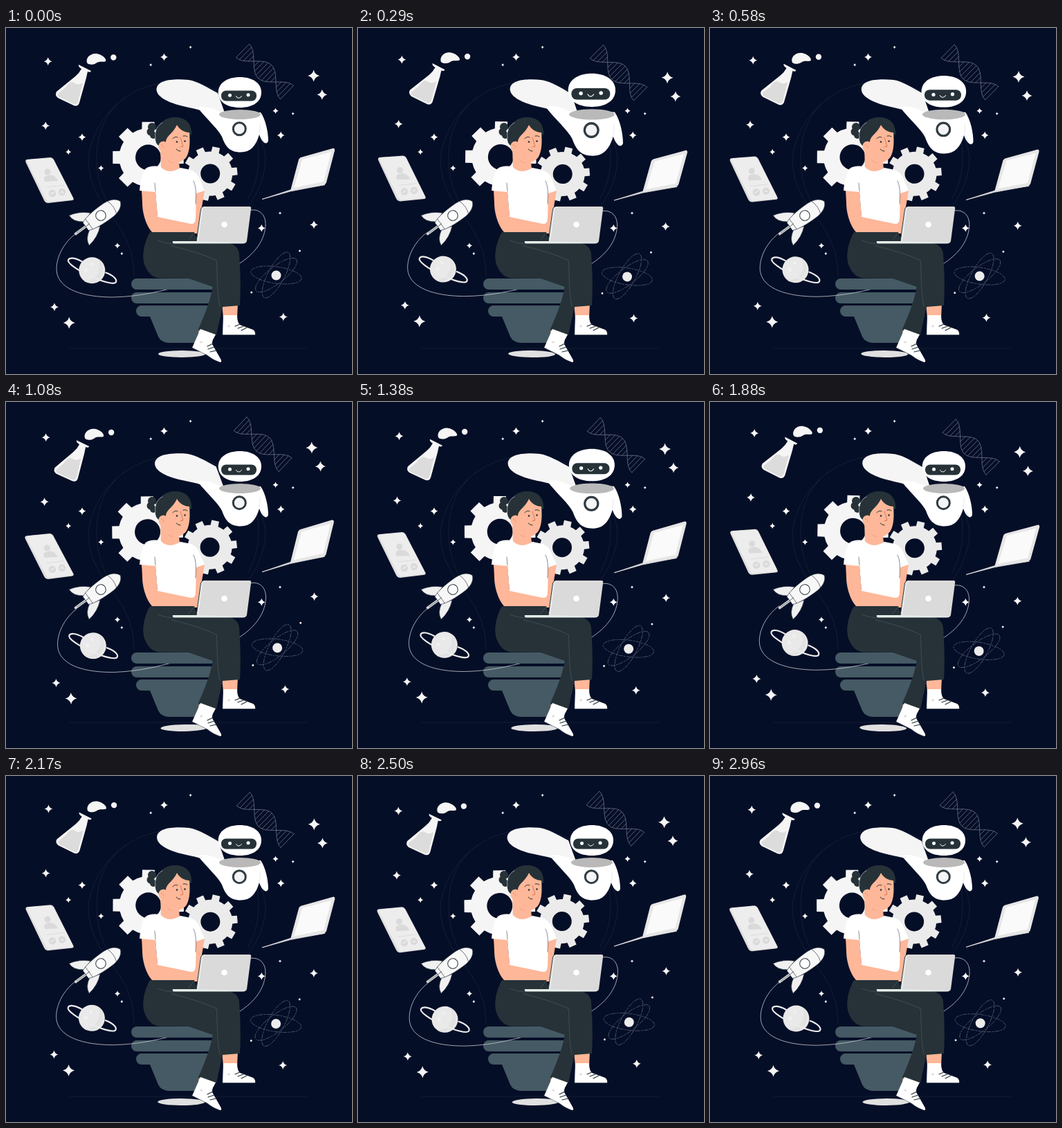
Write an HTML page that moves like this. It is 500x500 px and loops after 3000 ms.

```html
<!DOCTYPE html>
<html lang="en">
<head>
<meta charset="utf-8">
<title>Ideas in orbit</title>
<style>
  html, body { margin: 0; width: 100%; height: 100%; overflow: hidden; background: #050e27; }
  svg { display: block; width: 100vw; height: 100vh; }
</style>
</head>
<body>
<svg viewBox="0 0 500 500" fill="none" stroke-linecap="round" stroke-linejoin="round">
  <g id="bulbOutline" stroke="#18223b" stroke-width=".8">
    <path d="M185 357C184 315 169 294 149 267C130 243 119 218 119 187A129 125 0 0 1 375 187C375 222 358 250 335 278"/>
    <path d="M144 247C135 229 131 208 131 187C131 153 143 126 163 108M167 104L172 100M352 130C361 147 365 166 365 187C365 210 359 231 349 248"/>
    <path d="M92 463H435"/>
  </g>

  <g id="bulbBase" fill="#455a64">
    <path d="M189 382H300V398H189A8 8 0 0 1 189 382Z"/>
    <path d="M196 401H298L280 455H234Q224 454 220 446L208 417H196A8 8 0 0 1 196 401Z"/>
  </g>

  <g id="wind">
    <g id="movingStars" fill="#f5f5f5"></g>
    <path d="M101 297C78 314 70 341 74 356C80 378 111 389 155 389C196 388 224 380 260 371C305 360 371 336 375 286C376 266 362 260 350 264" stroke="#c9ccd3" stroke-width=".8"/>
    <ellipse cx="254" cy="471" rx="34" ry="5" fill="#e0e0e0"/>
    <path id="bigGear" fill="#f5f5f5" fill-rule="evenodd"/>
    <path id="smallGear" fill="#ebebeb" fill-rule="evenodd"/>
    <path d="M217.500 88C219 75 241 73 264 75C277 77 291 86 306 94L318 128L296 126C285 118 272 117 252 112C233 107 217 99 217.500 88Z" fill="#f5f5f5"/>

    <g id="flask">
      <path d="M105 53Q104 56 109 59Q106 65 100 70L73 92Q70 97 75 101L98 112Q104 114 106 108L116 72Q117 67 118 63Q122 65 123 62Z" fill="#f5f5f5"/>
      <path d="M86 86L75 95Q74 98 77 100L98 110Q102 111 104 107L111 79Q104 84 98 79Q92 76 86 86Z" fill="#dcdcdc"/>
      <path d="M117 50C115 43 122 36 131 37C139 38 146 45 144 48C140 50 135 47 130 51C125 54 118 53 117 50Z" fill="#f5f5f5"/>
      <circle cx="155.3" cy="42.5" r="4.2" fill="#f5f5f5"/>
    </g>

    <g id="dna" stroke="#6b7386" stroke-width=".8"></g>

    <g id="phone">
      <path d="M30 190L64 187Q67 187 69 190L97 245Q99 248 96 249L61 253Q57 253 55 249L29 195Q27 191 30 190Z" fill="#dedede"/>
      <path d="M33 190L64 188Q66 188 68 190L96 244Q98 248 94 248L63 251Q60 251 58 248L31 194Q30 191 33 190Z" fill="#ededed"/>
      <g fill="#dadada">
        <circle cx="60" cy="208" r="4.5"/>
        <path d="M55 219Q54 214 61 213Q69 211 74 219L75 221L56 222Z"/>
        <circle cx="67" cy="239" r="5.2"/><circle cx="81" cy="237" r="5.2"/>
      </g>
      <path d="M59 230L84 227" stroke="#dcdcdc"/>
      <path d="M65 240L69 237M79 238Q81 235 83 238" stroke="#f8f8f8"/>
    </g>

    <g id="sideLaptop">
      <path d="M370.500 247.300L411 234L461 226.500L411 236Z" fill="#d6d6d6" stroke="#e6e6e6" stroke-width=".8"/>
      <path d="M426 187L472 174Q475 173 475 177L463 223Q462 226 458 227L411 235L423 190Q424 188 426 187Z" fill="#e6e6e6"/>
      <path d="M428 190L470 179L459 222L416 231Z" fill="#fafafa"/>
    </g>

    <g id="planet">
      <circle cx="124.3" cy="350.3" r="19" fill="#e9e9e9"/>
      <path d="M133 334A19 19 0 0 1 113 366A22 22 0 0 0 133 334Z" fill="#e2e2e2"/>
      <g fill="#f0f0f0"><circle cx="123" cy="341" r="2.5"/><circle cx="116" cy="350" r="3"/></g>
      <path d="M-19 -6C-31 -7 -38 -4 -38 0C-38 5 -20 8 0 8S38 5 38 0C38 -4 31 -7 19 -6" transform="translate(124.5 351) rotate(25)" stroke="#ebebeb" stroke-width="2.2"/>
    </g>

    <g id="atom">
      <g id="orbits" stroke="#525b70" stroke-width=".8" stroke-dasharray="6 2 2 2"></g>
      <g fill="#ececec"><circle cx="390.5" cy="357.5" r="7"/><circle cx="424.5" cy="322" r="1.5"/><circle cx="354.8" cy="382" r="1.5"/></g>
    </g>
  </g>

  <g id="fixedStars" fill="#fff"></g>

  <g id="rocket" transform="translate(137 271) rotate(-36)" stroke="#27313d" stroke-width=".6">
    <path d="M-10 -12Q-22 -24 -37 -27Q-38 -16 -25 -7ZM-10 12Q-22 23 -39 25Q-38 14 -25 7Z" fill="#f0f0f0"/>
    <path d="M-25 -2H-46Q-48 0 -46 2H-25Z" fill="#e0e0e0"/>
    <path d="M35 0C32 -8 23 -12 10 -12C-5 -12 -18 -11 -27 -7V7C-18 11 -5 12 10 12C23 12 32 8 35 0Z" fill="#f7f7f7"/>
    <path d="M20 -11Q24 0 20 11M-21 -9V9"/>
    <path d="M-20 0H-43"/>
    <circle r="7.3" fill="#fff" stroke-width="1"/>
  </g>

  <g id="robot">
    <path d="M277 115C287 112 300 116 309 121L368 122C375 132 379 150 379 163C377 170 370 166 366 154C361 171 353 179.500 339 179.500C323 179.500 317 171 312 157C306 145 290 132 277 115Z" fill="#fff"/>
    <path d="M366 153Q368 145 367 138" stroke="#e0e0e0" stroke-width=".7"/>
    <ellipse cx="338" cy="125" rx="30" ry="7" fill="#b9b9b9"/>
    <circle cx="337.3" cy="145.7" r="9" stroke="#303b43" stroke-width="3" fill="#f5f5f5"/>
    <path d="M338 71C356 71 369 79.500 369 93S357 115 338 115C318 115 306.700 106 306.700 93S319 71 338 71Z" fill="#fff"/>
    <rect x="311" y="90.5" width="51" height="15" rx="7" fill="#263238"/>
    <g fill="#fff"><circle cx="323.5" cy="97.3" r="2.5"/><circle cx="350" cy="96.8" r="2.5"/></g>
    <path d="M332.5 98.5Q336 104 340.5 98.5" stroke="#fff"/>
  </g>

  <path id="bulbCollar" d="M189 362H302V378H189A8 8 0 0 1 189 362Z" fill="#455a64"/>

  <g id="person">
    <g fill="#feb798">
      <path d="M312 398H335L334 419H314ZM280 431L304 440L300 449L278 441Z"/>
      <path d="M196 233L216 235L219 272L273 281L275 235H287L281 270L278 297H214C206 293 197 272 197 253Z"/>
      <path d="M223 172L224 203Q236 212 251 203L249 186Z"/>
    </g>
    <path d="M208 295C200 309 195 330 201 344C205 354 212 361 222 361.500L264 362L298.500 374C297 388 289 411 277.500 436L304 444C308 425 311 412 313 403L338 401C340 370 338 345 337 326C336 316 328 311 316 310L276 307L272 295Z" fill="#263238"/>
    <path d="M239 315C258 319 285 327 304 336C306 352 304 378 309 402M219 307Q231 312 243 312M271 297L264 306" stroke="#455a64" stroke-width=".7"/>
    <path d="M223 200Q234 213 252 202L267 205Q276 209 279 216L287 235L275 239L274 275Q274 284 267 283L219 273L216 237L193 235Q195 211 202 203Q208 198 223 200Z" fill="#fff"/>
    <path d="M271 221Q276 230 274 254M216 236L215 224" stroke="#3a454c" stroke-width=".6"/>

    <g id="head">
      <g fill="#263238">
        <circle cx="211" cy="143" r="6"/><circle cx="209" cy="150" r="5.5"/><circle cx="213" cy="155" r="5"/>
        <path d="M217 166C211 147 224 129 245 129C259 129 269 138 268 154L250 164L230 172Q220 172 217 166Z"/>
      </g>
      <path d="M231 165C231 156 241 153 247 140C251 147 258 151 265 151C266 164 266 177 261 186C255 195 243 197 234 190L229 179C222 179 219 173 221 168C223 163 229 163 231 165Z" fill="#feb798"/>
      <path d="M233 190Q237 194 241 194Q237 196 233 190Z" fill="#ee9d83"/>
      <path d="M216 159C214 149 219 140 226 137" stroke="#c5cbce" stroke-width=".7"/>
      <g fill="#263238"><circle cx="247" cy="164.5" r="1.3"/><circle cx="258.5" cy="163.5" r="1.3"/></g>
      <path d="M241 160Q244 156 248 158M256 156Q260 155 262 157M246 175Q248 178 252 178" stroke="#263238" stroke-width="1"/>
      <path d="M252 158L256 171L252 172" stroke="#c26d55" stroke-width=".8"/>
      <path d="M224 169Q227 168 228 173" stroke="#df8e75" stroke-width=".7"/>
    </g>

    <g fill="#fff">
      <path d="M281 435L303 443Q297 452 298 457L310 478Q313 483 309 483Q298 479 291 473L269 462Z"/>
      <path d="M314 415H334Q334 425 338 429L357 436Q361 439 360 443.5H313Z"/>
    </g>
    <g stroke="#263238" stroke-width="1.2">
      <path d="M291 460L299 456M292 464L301 461M295 468L304 466M331 431L338 428M335 434L343 431M340 437L348 433"/>
      <path d="M313 443.5H360M269 462L291 473Q299 480 309 483" stroke-width=".5"/>
    </g>
    <g fill="#e0e0e0"><circle cx="282" cy="454" r="1.8"/><circle cx="322" cy="431" r="1.8"/></g>

    <g id="lapComputer">
      <path d="M286 258H352Q355 258 354 262L348 308Q347 311 344 311H275L281 262Q282 258 286 258Z" fill="#dadada"/>
      <path d="M286 258Q282 258 281.500 262L275 308" stroke="#303a42" stroke-width="1"/>
      <path d="M287 259Q284 259 283.500 262L277 309" stroke="#ededed" stroke-width="1.5"/>
      <path d="M241 308H276L346 310Q345 311.500 342 311.500H243Q240 311 241 308Z" fill="#e6ece9"/>
      <circle cx="315.500" cy="284" r="4.300" fill="#fff"/>
    </g>
  </g>
</svg>

<script>
const byId = id => document.getElementById(id);
const TAU = Math.PI * 2;

const star = ([x, y, r]) => {
  const k = r * 0.2;
  return `<path d="M${x} ${y - r}Q${x + k} ${y - k} ${x + r} ${y}Q${x + k} ${y + k} ${x} ${y + r}Q${x - k} ${y + k} ${x - r} ${y}Q${x - k} ${y - k} ${x} ${y - r}Z"/>`;
};
byId('movingStars').innerHTML = [
  [60.7, 48.3, 6], [57.2, 141.3, 6], [444.6, 69, 8.5], [456.8, 96.2, 7.5],
  [445, 284.2, 6], [400.8, 417.5, 6], [70, 403.2, 6], [91.2, 426, 8.5]
].map(star).join('');
byId('fixedStars').innerHTML = [
  [228.5, 42, 5.5], [110, 157.7, 5.5], [137.3, 202.5, 4.2], [90.2, 179, 4],
  [389.5, 119.7, 4], [397.2, 155, 5.5], [369.3, 289.3, 5.5], [161, 314.5, 4.2],
  [167.3, 326, 2.2], [396, 267.5, 2.2], [266.6, 27.8, 2.2], [209.2, 53.3, 2.2], [414.7, 123.7, 2.2]
].map(star).join('');

function gearPath(cx, cy, hole, inner, outer, teeth, phase) {
  const step = TAU / teeth;
  const at = (r, a) => `${(cx + r * Math.cos(a)).toFixed(2)} ${(cy + r * Math.sin(a)).toFixed(2)}`;
  let d = '';
  for (let i = 0; i < teeth; i++) {
    const a = phase + i * step;
    d += `${i ? 'L' : 'M'}${at(inner, a - step * 0.28)}L${at(outer, a - step * 0.22)}L${at(outer, a + step * 0.22)}`
      + `L${at(inner, a + step * 0.28)}A${inner} ${inner} 0 0 1 ${at(inner, a + step * 0.72)}`;
  }
  return `${d}ZM${cx - hole} ${cy}a${hole} ${hole} 0 1 0 ${2 * hole} 0a${hole} ${hole} 0 1 0 ${-2 * hole} 0Z`;
}
byId('bigGear').setAttribute('d', gearPath(205.5, 187, 18.5, 42, 52, 8, 0));
byId('smallGear').setAttribute('d', gearPath(295.2, 210.5, 14, 32, 39.5, 10, -1.35));

// Two strands swing across a diagonal axis, joined by rungs.
function dnaMarkup() {
  const point = (s, side) => {
    const swing = side * 13.5 * Math.cos(TAU * s);
    return `${(342 + 64 * s + 0.7 * swing).toFixed(1)} ${(33 + 60 * s - 0.72 * swing).toFixed(1)}`;
  };
  const strand = side => 'M' + Array.from({ length: 41 }, (_, i) => point(i / 40, side)).join('L');
  let rungs = '';
  for (let i = 0; i <= 16; i++) rungs += `M${point(i / 16, 1)}L${point(i / 16, -1)}`;
  return `<path d="${strand(1)}"/><path d="${strand(-1)}"/><path d="${rungs}"/>`;
}
byId('dna').innerHTML = dnaMarkup();
byId('orbits').innerHTML = [8, 118, -38].map(a =>
  `<ellipse rx="37" ry="12" transform="translate(390.5 357) rotate(${a})"/>`).join('');

// Piecewise linear value through [position, value] stops.
function track(stops, p) {
  const i = Math.max(1, stops.findIndex(s => p <= s[0]));
  const [p0, v0] = stops[i - 1], [p1, v1] = stops[i];
  return v0 + (v1 - v0) * (p - p0) / (p1 - p0);
}
const WIND = [[0, 0], [0.25, 1], [0.75, -1], [1, 0]];
const BEAT = [[0, 1], [0.1, 1.1], [0.25, 1], [0.4, 1], [0.5, 1.1], [0.6, 1], [1, 1]];
const wind = byId('wind'), robot = byId('robot');

function render(ms) {
  const angle = track(WIND, (ms % 1500) / 1500);
  const scale = track(BEAT, (ms % 3000) / 3000);
  wind.setAttribute('transform', `rotate(${angle} 251 249)`);
  robot.setAttribute('transform', `translate(338 126) scale(${scale}) translate(-338 -126)`);
}

const start = performance.now();
function frame() {
  render(performance.now() - start);
  requestAnimationFrame(frame);
}
frame();
</script>
</body>
</html>
```
